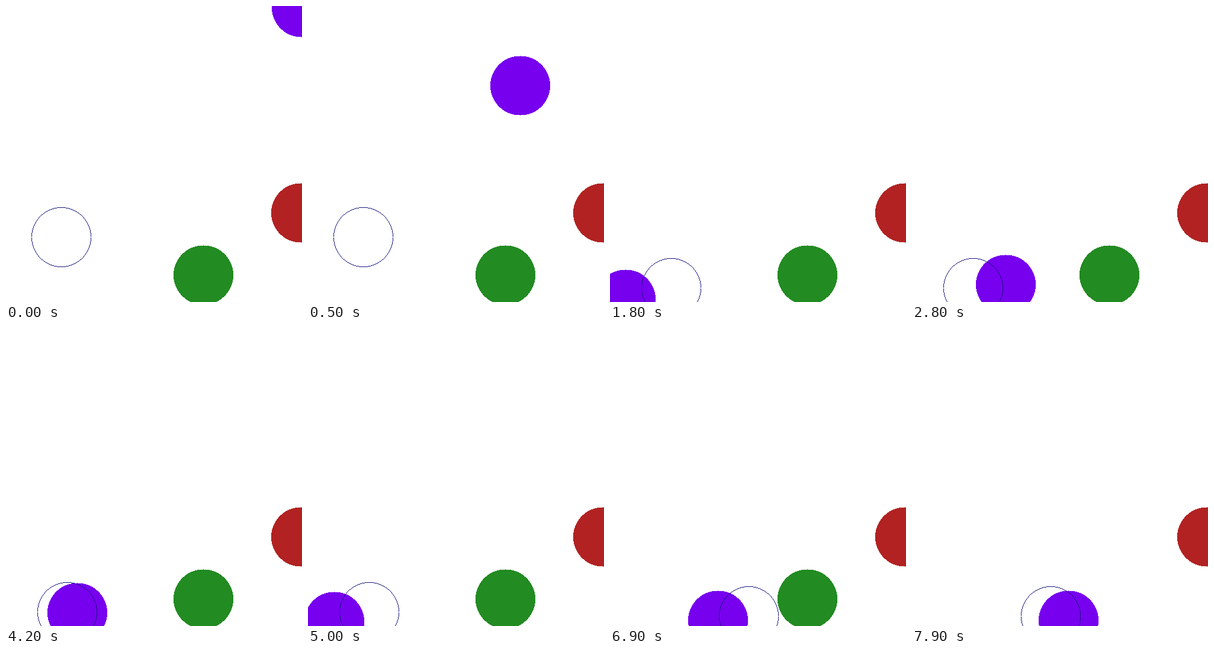
An HTML page with a canvas that plays this animation: 500x500 px, repeating every 8000 ms.

```html
<!DOCTYPE html>
<html lang="en">
<head>
<meta charset="utf-8">
<title>Ball chasing a ring</title>
<style>
  html, body { margin: 0; width: 100%; height: 100%; overflow: hidden; background: #fff; }
  canvas { display: block; width: 100vw; height: 100vh; image-rendering: pixelated; }
</style>
</head>
<body>
<canvas width="500" height="500"></canvas>
<script>
  const LOOP = 8000, STEP = 100, SIZE = 500, RADIUS = 50;
  const OMEGA = 0.1585, DAMPING = 0.011;
  const GREEN_GONE = 76;

  // Each leg is a damped spring: start step, position, velocity, point of pull.
  const legs = [
    { at: 0, pos: [499, 2], vel: [-5.7, 4.6], pull: [93, 390] },
    { at: 13.35, pos: [0, 500], vel: [0, 0], pull: [102.5, 480.7] },
    { at: 57.5, pos: [51.9, 490.3], vel: [5.4, -1], pull: [236, 490] },
    { at: 65, pos: [170, 490], vel: [0, 0], pull: [234, 490] }
  ];

  const ringStops = [
    { at: 0, pos: [93, 390] },
    { at: 12, pos: [103, 476] },
    { at: 58, pos: [236, 486] },
    { at: 65, pos: [234, 483] }
  ];

  const ctx = document.querySelector('canvas').getContext('2d');

  const current = (list, step) => list.filter(item => item.at <= step).pop();
  const clamp = v => Math.max(0, Math.min(SIZE, v));
  const halfChord = d => Math.round(Math.sqrt(RADIUS * RADIUS - d * d));

  function ballAt(step) {
    const { at, pos, vel, pull } = current(legs, step);
    const t = step - at;
    const fade = Math.exp(-DAMPING * t);
    const cos = Math.cos(OMEGA * t);
    const sin = Math.sin(OMEGA * t) / OMEGA;
    return pos.map((p, i) => {
      const d = p - pull[i];
      const v = pull[i] + fade * (d * cos + (vel[i] + DAMPING * d) * sin);
      return Math.round(clamp(v));
    });
  }

  // Circles are drawn in whole pixels, without smoothing.
  function disc([x, y], color) {
    ctx.fillStyle = color;
    for (let d = -RADIUS; d <= RADIUS; d++) {
      const half = halfChord(d);
      ctx.fillRect(x - half, y + d, 2 * half + 1, 1);
    }
  }

  function ring([x, y], color) {
    const reach = Math.floor(RADIUS * Math.SQRT1_2);
    ctx.fillStyle = color;
    for (let d = -reach; d <= reach; d++) {
      const half = halfChord(d);
      for (const side of [-half, half]) {
        ctx.fillRect(x + d, y + side, 1, 1);
        // small gap at the far left and right
        if (d !== 0) ctx.fillRect(x + side, y + d, 1, 1);
      }
    }
  }

  function draw(ms) {
    const step = Math.floor((ms % LOOP) / STEP);
    ctx.fillStyle = '#fff';
    ctx.fillRect(0, 0, SIZE, SIZE);
    disc([498, 349], '#b22222');
    if (step < GREEN_GONE) disc([333, 454], '#228b22');
    disc(ballAt(step), '#7700ee');
    ring(current(ringStops, step).pos, '#191980');
  }

  const start = performance.now();
  function tick() {
    draw(performance.now() - start);
    requestAnimationFrame(tick);
  }
  tick();
</script>
</body>
</html>
```
